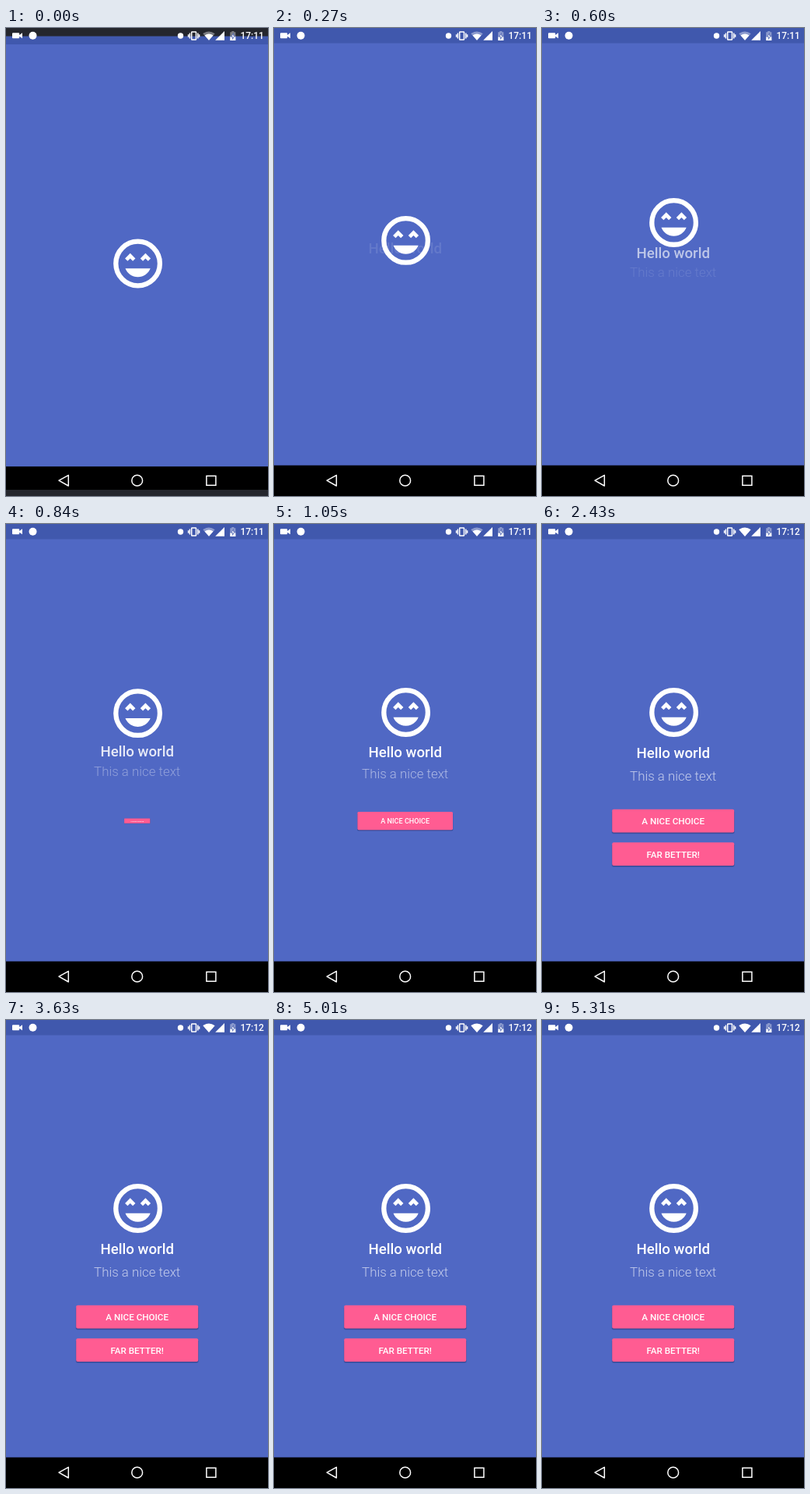
Recreate the animation shown at these times as an HTML page. Size 337 px wide and 600 px high, loop 5.34 s.

```html
<!DOCTYPE html>
<html lang="en">
<head>
<meta charset="utf-8">
<title>Welcome screen</title>
<style>
  html, body { margin: 0; width: 100%; height: 100%; overflow: hidden; background: #24262d; }
  svg { display: block; width: 337px; height: 600px; }
  text { font-family: Roboto, sans-serif; fill: #fff; }
  .mid { text-anchor: middle; }
  .label { font-size: 11.65px; font-weight: 500; }
  .line { fill: none; stroke: #fff; stroke-width: 1.5; }
</style>
</head>
<body>
<svg viewBox="0 0 337 600">
  <defs>
    <clipPath id="crop"><rect id="cropBox" width="337"/></clipPath>
    <g id="plate">
      <rect x="-79" y="-13" width="158" height="29.5" rx="2" fill="#283a7c" opacity=".3"/>
      <rect x="-78.5" y="-14" width="157" height="30" rx="2" fill="#34468f" opacity=".75"/>
      <rect x="-78.5" y="-15" width="157" height="29.7" rx="2" fill="#ff5c92"/>
    </g>
  </defs>

  <rect width="337" height="600" fill="#24262d"/>
  <g clip-path="url(#crop)">
    <g id="win">
      <rect y="-4" width="337" height="608" fill="#5068c4"/>
      <rect width="337" height="19.5" fill="#4058ad"/>
      <rect y="560.7" width="337" height="50" fill="#000"/>

      <g id="face" fill="#fff">
        <circle r="28.3" fill="none" stroke="#fff" stroke-width="6.3"/>
        <path transform="scale(3.15) translate(-12 -12)" d="M13 9.94 14.06 11l1.06-1.06L16.18 11l1.06-1.06-2.12-2.12zM8.88 9.94 9.94 11 11 9.94 8.88 7.82 6.76 9.94 7.82 11zM12 17.5c2.33 0 4.31-1.46 5.11-3.5H6.89c.8 2.04 2.78 3.5 5.11 3.5z"/>
      </g>
      <text id="title" class="mid" font-size="18.7" font-weight="500">Hello world</text>
      <text id="sub" class="mid" font-size="16.85" font-weight="300" style="fill:#c5cdec">This a nice text</text>
      <g id="first"><use href="#plate"/><text class="mid label" y="4.2">A NICE CHOICE</text></g>
      <g id="second"><use href="#plate"/><text class="mid label" y="4.2">FAR BETTER!</text></g>
    </g>
  </g>

  <!-- status bar -->
  <g fill="#fff">
    <path d="M9 6.3h7.2a1 1 0 0 1 1 1v1.6l3.8-2.6v7l-3.8-2.6v1.6a1 1 0 0 1-1 1H9a1 1 0 0 1-1-1v-5a1 1 0 0 1 1-1z"/>
    <circle cx="34.5" cy="9.8" r="5"/>
    <circle cx="224.5" cy="10" r="3.7"/>
    <rect x="238.7" y="4.9" width="5.8" height="10.2" rx=".6" class="line"/>
    <path d="M236.4 6.5v7M234.6 8.2v3.6M246.8 6.5v7M248.6 8.2v3.6" class="line" stroke-width="1.2"/>
    <path d="M253.3 7.2Q261 1.6 268.7 7.2L261 15.8z" id="wifi"/>
    <path d="M255.5 9.5Q261 5.5 266.5 9.5L261 15.8z"/>
    <path d="M281 4v11.8h-11.8z"/>
    <path d="M290.3 4h3v1.2h2v10.8h-7V5.2h2z" opacity=".4"/>
    <path d="M288.3 11.5h7V16h-7z"/>
    <path d="M292.6 6.6 289.8 11.2h1.6v3.2l2.7-4.8h-1.5z" stroke="#4058ad" stroke-width=".7"/>
    <text id="clock" x="301.6" y="14.2" font-size="11.9" font-weight="500"></text>
  </g>

  <!-- navigation bar -->
  <g class="line">
    <path d="M68 580.2 80.3 573.4V587z" stroke-linejoin="round"/>
    <circle cx="168.7" cy="580.2" r="6.9"/>
    <rect x="257.9" y="574.3" width="12" height="12"/>
  </g>
</svg>

<script>
const LOOP = 5340, CX = 168.7;
const el = id => document.getElementById(id);
const set = (id, name, value) => el(id).setAttribute(name, value);

// Decelerating progress from 0 to 1
const ease = (t, start, span, power = 2) =>
  1 - (1 - Math.min(1, Math.max(0, (t - start) / span))) ** power;

const move = (id, x, y, scale = 1) =>
  set(id, 'transform', `translate(${x} ${y}) scale(${scale})`);

function fadeIn(id, t, start, y) {
  const p = ease(t, start, 1000);
  move(id, CX, y - 12 * (1 - p));
  set(id, 'opacity', p);
}

function draw(t) {
  const hidden = 1 - ease(t, 0, 150);
  set('cropBox', 'y', 11 * hidden);
  set('cropBox', 'height', 600 - 19 * hidden);
  move('win', 0, 1.5 * hidden);

  move('face', 169.6, 300.5 - 59 * ease(t, 35, 1000, 2.4));
  fadeIn('title', t, 215, 299.8);
  fadeIn('sub', t, 505, 328.7);
  move('first', CX, 380.7, ease(t, 785, 500));
  move('second', CX, 423.3, ease(t, 1055, 500));

  set('wifi', 'opacity', t < 1950 ? 0.4 : 1);
  el('clock').textContent = t < 2370 ? '17:11' : '17:12';
}

const begin = performance.now();
function frame() {
  draw((performance.now() - begin) % LOOP);
  requestAnimationFrame(frame);
}
frame();
</script>
</body>
</html>
```
